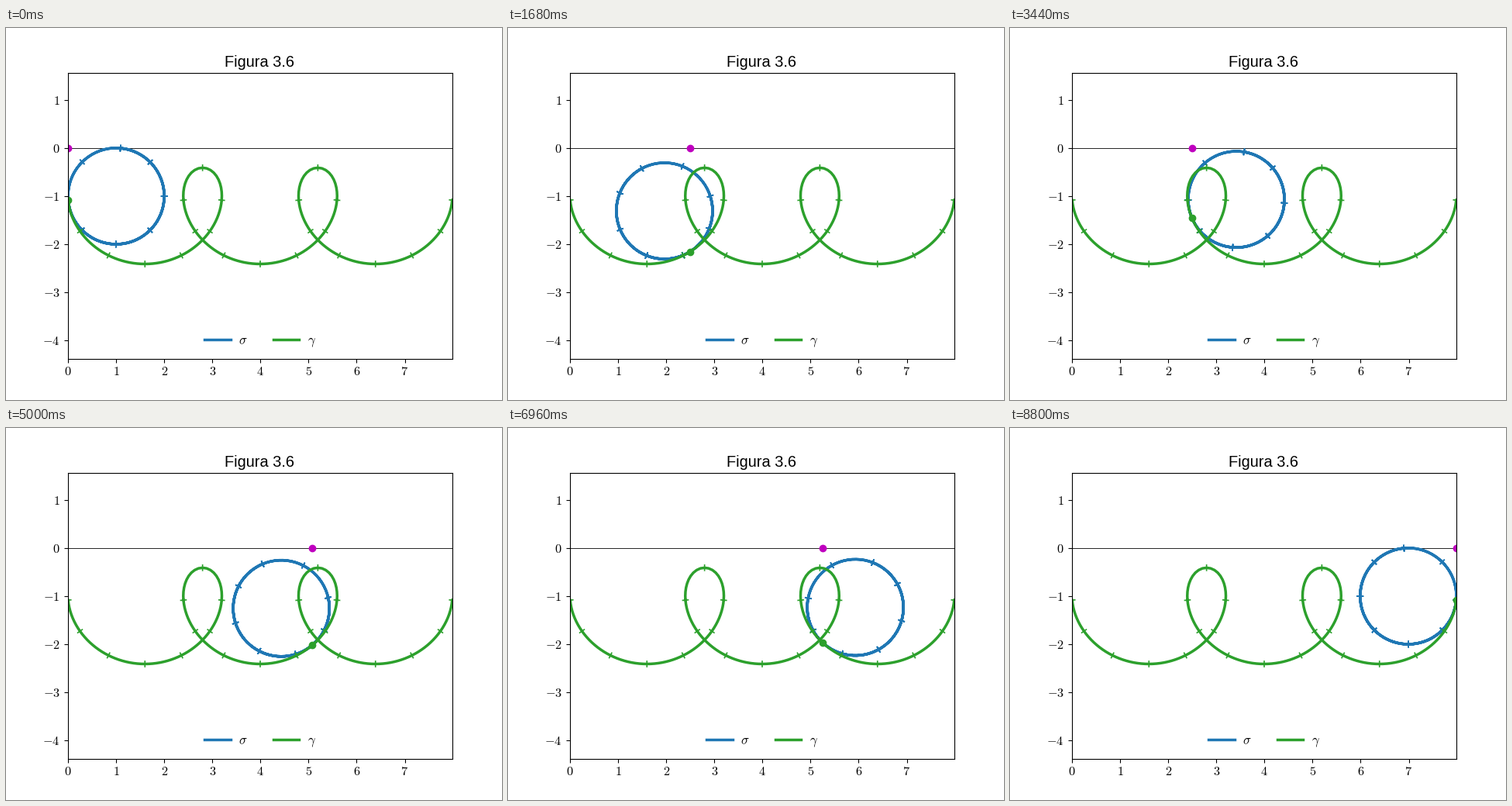
Recreate the animation shown at these times as a matplotlib script. Size 640 by 480 pixels, loop 8.84 s.

```python
import numpy as np
import matplotlib.pyplot as plt
from matplotlib.animation import FuncAnimation

plt.rcParams.update({"mathtext.fontset": "cm", "font.size": 12})

BLUE, GREEN, MAGENTA = "#1f77b4", "#2ca02c", "#bf00bf"
A = np.sqrt(2)          # distance from the pole to the wheel's centre
FRAMES = 221
TICK = 0.07             # half length of the cross marks


def wheel(t):
    """Unit circle as seen from the pole."""
    return A + np.exp(1j * t)


# Angle of contact in each step; the near side of the wheel, between
# the two tangents from the pole, is passed a little faster.
even = np.radians(-135 + 4.5 * np.arange(FRAMES))
from_near = np.mod(even, 2 * np.pi) - np.pi
near = np.abs(from_near) < np.pi / 4 + 1e-6
turn = even + np.where(near, from_near / 9, 0)

# Road under the wheel: dx = r dtheta, y = -r
fine = np.linspace(even[0], even[-1], 20001)
speed = (1 + A * np.cos(fine)) / np.abs(wheel(fine))
run = np.concatenate([[0], np.cumsum((speed[1:] + speed[:-1]) / 2 * np.diff(fine))])
length = run[-1]


# Outside the table the run is mirrored, since the speed vanishes at both ends.
road_x = np.interp(turn, fine, run)
road = road_x - 1j * np.abs(wheel(turn))


def placed(points, i):
    """Move wheel points so that the contact lies straight below the pole."""
    p = wheel(turn[i])
    return road_x[i] - 1j * points * abs(p) / p


def cross_marks(points, normals):
    gap = np.full(len(points), np.nan + 0j)
    return np.column_stack([points - TICK * normals, points + TICK * normals, gap]).ravel()


def xy(z):
    return z.real, z.imag


# The rim is traced over all the turns in one path.
rim = wheel(turn)
rim_n = np.exp(1j * turn)
rim_marks = cross_marks(rim[::10], rim_n[::10])

# The road's normal is the wheel's normal at the point of contact.
road_n = -1j * rim_n * np.abs(rim) / rim
road_marks = cross_marks(road[::10], road_n[::10])

fig = plt.figure(figsize=(6.4, 4.8), dpi=100)
ax = fig.add_axes([0.125, 0.11, 0.775, 0.77])
half = length * 369.6 / 496 / 2
ax.set_xlim(0, length)
ax.set_ylim(-A - half, -A + half)
ax.set_xticks(range(8), [f"${v}$" for v in range(8)])
ax.set_yticks(range(-4, 2), [f"${v}$" for v in range(-4, 2)])
ax.tick_params(axis="x", labelsize=11.75, pad=2.8)
ax.tick_params(axis="y", labelsize=11.75, pad=3.8)
ax.set_title("Figura 3.6", fontname="Liberation Sans", fontsize=14.4,
             x=0.4977, pad=5.5)

ax.axhline(0, color="black", lw=0.6)
circle, = ax.plot([], [], color=BLUE, lw=2.5, label=r"$\sigma$")
circle_marks, = ax.plot([], [], color=BLUE, lw=1.2, solid_capstyle="butt")
ax.plot(*xy(road), color=GREEN, lw=2.5, label=r"$\gamma$")
ax.plot(*xy(road_marks), color=GREEN, lw=1.2, solid_capstyle="butt")
pole, = ax.plot([], [], "o", color=MAGENTA, ms=6)
contact, = ax.plot([], [], "o", color=GREEN, ms=6)
ax.legend(loc="lower center", ncol=2, frameon=False, fontsize=12,
          handletextpad=0.63, borderaxespad=0.42)


def update(i):
    circle.set_data(*xy(placed(rim, i)))
    circle_marks.set_data(*xy(placed(rim_marks, i)))
    pole.set_data([road_x[i]], [0])
    contact.set_data([road[i].real], [road[i].imag])
    return circle, circle_marks, pole, contact


anim = FuncAnimation(fig, update, frames=FRAMES, interval=40, repeat=True,
                     repeat_delay=0, blit=False)
plt.show()
```
